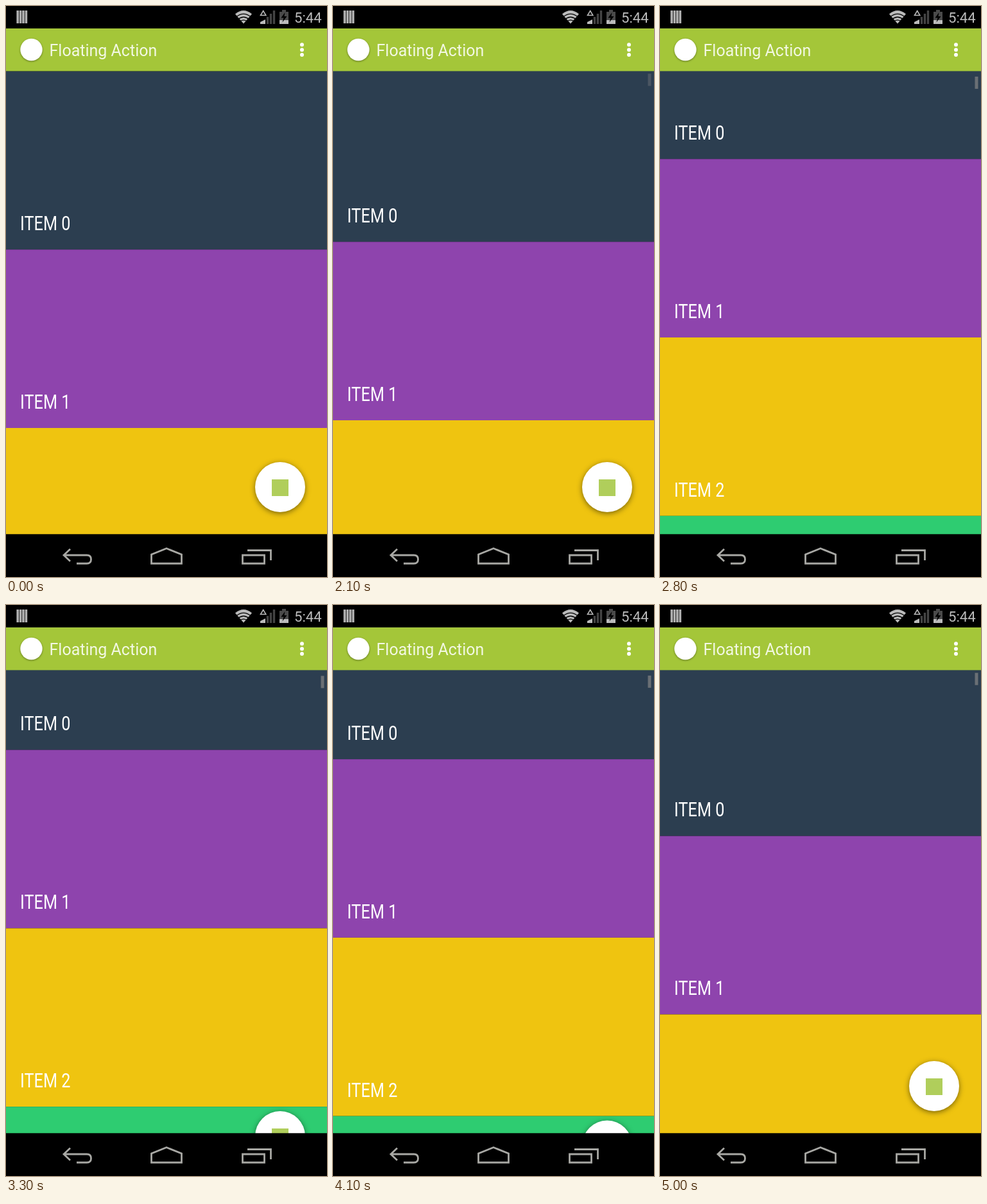
Recreate the animation shown at these times as an HTML page. Size 500 px wide and 889 px high, loop 5.1 s.

```html
<!DOCTYPE html>
<html lang="en">
<head>
<meta charset="utf-8">
<title>Floating Action</title>
<style>
  html, body { margin: 0; width: 100%; height: 100%; overflow: hidden; background: #000; }
  svg { display: block; width: 500px; height: 889px; font-family: Roboto, sans-serif; }
  .item { font-size: 30.5px; fill: #fff; }
  .line { fill: none; stroke: #a8a8a4; stroke-width: 2.8; }
  .soft { filter: drop-shadow(0 1px 1.5px rgba(0, 0, 0, .4)); }
  .fab { filter: drop-shadow(0 2px 4px rgba(0, 0, 0, .5)); }
</style>
</head>
<body>
<svg viewBox="0 0 500 889">
  <g id="list"></g>
  <rect id="thumb" x="490.500" width="5" height="19" fill="#858585"/>
  <g id="fab">
    <circle class="fab" cx="427" cy="749" r="39" fill="#fff"/>
    <rect x="414" y="737" width="26" height="26" fill="#b0ce5b"/>
  </g>

  <rect y="34.700" width="500" height="66.700" fill="#a4c639"/>
  <circle class="soft" cx="39.500" cy="68" r="17.200" fill="#fff"/>
  <text x="67.500" y="78" font-size="25" fill="#f3f8e4">Floating Action</text>
  <path d="M461 60.300v0M461 68.200v0M461 76v0" stroke="#fff" stroke-width="6" stroke-linecap="round"/>

  <rect width="500" height="34.700"/>
  <path d="M18.200 7v20M22.600 7v20M27 7v20M31.400 7v20" stroke="#b0b0b0" stroke-width="3.600"/>
  <path d="M370 27.500L357 12.500q13-11 26 0z" fill="#bbb"/>
  <path d="M358 17.300q12-10 24 0M361 21q9-7.500 18 0M364 24.300q6-5 12 0" fill="none" stroke="#000" stroke-width="1.300"/>
  <path d="M396.500 14.500l4.200-7 4.200 7z" fill="none" stroke="#bbb" stroke-width="1.500"/>
  <path d="M396 28v-3l8-4v7z" fill="#bbb"/>
  <path d="M407.500 28V17M412.500 28V12M417.500 28V7" stroke="#444" stroke-width="3.400"/>
  <path d="M426 9h4V6h6v3h4v19h-14z" fill="#4a4a4a"/>
  <path d="M426 22h14v6h-14z" fill="#bbb"/>
  <path d="M434.500 10l-6 8.500h4l-2 7 7-9.500h-4z" fill="#000"/>
  <text x="449" y="26" font-size="22.200" fill="#bbb">5:44</text>

  <rect y="822.300" width="500" height="67"/>
  <g class="line">
    <path d="M100 845.500L90 855l10 9.500M90 855h36q6.500 0 6.500 6.500t-6.500 6.500h-16"/>
    <path d="M226.500 868V854L250 844.500l23.500 9.500v14z"/>
    <path d="M368.500 855h34v13h-34zM376 847.500h36.500V863"/>
  </g>
</svg>
<script>
const LOOP = 5100, STEP = 100, ITEM = 277.8, TOP = 101.4, HIDE = 122, HIDE_TIME = 300;
const colors = ['#2c3e50', '#8e44ad', '#efc410', '#2ecc71'];
// [time, scroll offset] at each turn of the finger
const turns = [[2356, 12], [3050, 193], [3750, 54], [4374, 197], [5100, 11]];
// [start time, 1 = slide out, 0 = slide in]
const slides = [[2480, 1], [3177, 0], [3898, 1], [4503, 0]];
const [list, thumb, fab] = ['list', 'thumb', 'fab'].map(id => document.getElementById(id));

// Labels use a condensed cut of the typeface
list.innerHTML = colors.map((color, i) => {
  const y = TOP + i * ITEM;
  return `<rect y="${y}" width="500" height="${ITEM}" fill="${color}"/>
    <text class="item" transform="translate(22 ${y + 247.6}) scale(.83 1)">ITEM ${i}</text>`;
}).join('');

const ease = u => (1 - Math.cos(Math.PI * Math.min(1, Math.max(0, u)))) / 2;

function scrollAt(t) {
  if (t < 2100) return 0;
  if (t < 2500) return 12;
  const i = turns.findIndex(([time]) => time > t);
  const [t0, y0] = turns[i - 1], [t1, y1] = turns[i];
  return y0 + (y1 - y0) * ease((t - t0) / (t1 - t0));
}

function fabOffset(t) {
  const slide = slides.filter(([start]) => start <= t).pop();
  if (!slide) return 0;
  const u = ease((t - slide[0]) / HIDE_TIME);
  return HIDE * (slide[1] ? u : 1 - u);
}

function draw(now) {
  const t = Math.floor(now % LOOP / STEP) * STEP;
  const scroll = scrollAt(t);
  list.setAttribute('transform', `translate(0 ${-scroll})`);
  fab.setAttribute('transform', `translate(0 ${fabOffset(t)})`);
  thumb.setAttribute('y', 105 + scroll * .035);
  thumb.setAttribute('opacity', t < 2100 ? 0 : t < 2500 ? .35 : .7);
  requestAnimationFrame(draw);
}
requestAnimationFrame(draw);
</script>
</body>
</html>
```
